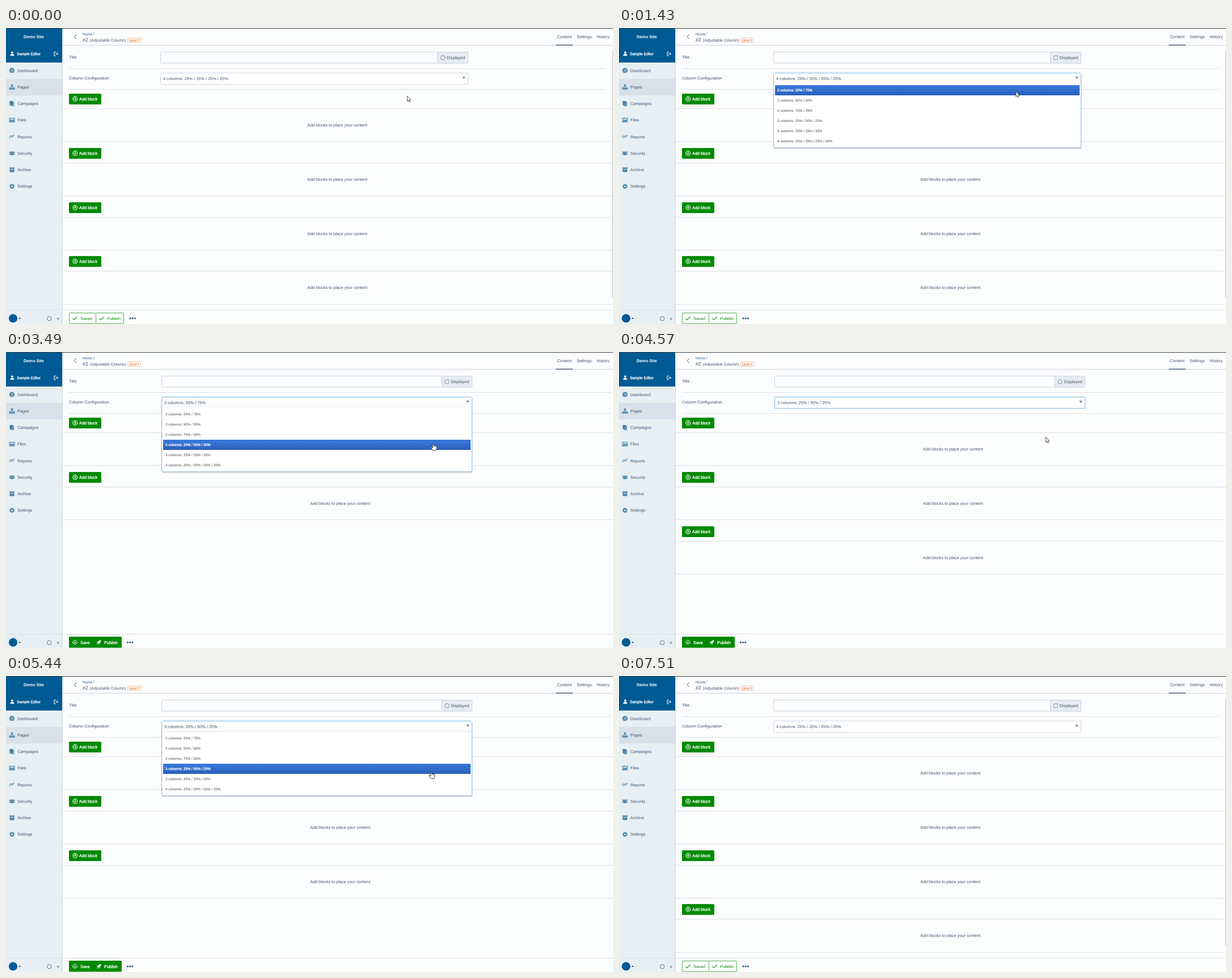
An HTML page for the animation above (7790 ms loop, 1070 by 523 pixels).

```html
<!DOCTYPE html>
<html lang="en">
<head>
<meta charset="utf-8">
<title>Column configuration</title>
<style>
  html, body { margin: 0; width: 100%; height: 100%; overflow: hidden; background: #fcfdfd; }
  svg { display: block; width: 1070px; height: 523px; }
  text { font-family: "Liberation Sans", Arial, sans-serif; text-rendering: geometricPrecision; white-space: pre; }
</style>
</head>
<body>
<svg id="stage" viewBox="0 0 1070 523" xmlns="http://www.w3.org/2000/svg">
  <defs>
    <linearGradient id="hot" x2="0" y2="1">
      <stop offset=".2" stop-color="#3875d7"/><stop offset=".9" stop-color="#2a62bc"/>
    </linearGradient>
    <linearGradient id="fade" x2="0" y2="1">
      <stop offset="0" stop-color="#fff"/><stop offset="1" stop-color="#f8f9f9"/>
    </linearGradient>
  </defs>
  <g id="page"></g>
  <g id="shell"></g>
  <g id="pointer"></g>
</svg>
<script>
const LOOP = 7790;
const INK = '#43536d', BLUE = '#005a93', GREEN = '#008a00', LINE = '#dce2e9', EDGE = '#ced5e1', ICON = '#4480a6';
const OPTIONS = [
  '2 columns: 25% / 75%', '2 columns: 50% / 50%', '2 columns: 75% / 25%',
  '3 columns: 25% / 50% / 25%', '3 columns: 33% / 33% / 33%', '4 columns: 25% / 25% / 25% / 25%'
];

// Each track lists [start time, ...value]; a value holds until the next one.
const CHOICE = [[0, 5], [1550, 0], [3890, 3], [6360, 5]];
const HOT = [[0, -1], [510, 5], [900, 0], [1550, -1], [2610, 0], [3000, 1], [3120, 2], [3490, 3],
  [3890, -1], [4930, 3], [5170, 1], [5290, 3], [5560, 4], [5710, 5], [6360, -1]];
const CURSOR = [
  [0, 707, 120, 'arrow'], [120, 700, 112, 'arrow'], [240, 689, 99, 'hand'], [360, 690, 95, 'hand'],
  [630, 694, 96, 'hand'], [750, 698, 98, 'hand'], [900, 700, 111, 'hand'], [1430, 699.5, 112, 'arrow'],
  [2200, 703, 109, 'arrow'], [2320, 710, 100, 'arrow'], [2470, 713, 92.5, 'hand'],
  [2880, 718, 104, 'hand'], [3000, 733, 127, 'hand'], [3120, 746, 150, 'hand'], [3490, 751.5, 161.5, 'hand'],
  [3610, 752, 166, 'hand'], [3890, 752, 166, 'arrow'], [4570, 752, 150, 'arrow'], [4690, 750, 118, 'arrow'],
  [4810, 748, 96, 'hand'], [4930, 747.5, 92, 'hand'], [5170, 748, 126, 'hand'], [5290, 748, 159, 'hand'],
  [5440, 748, 169, 'hand'], [5560, 748, 189, 'hand'], [5710, 748, 192, 'hand'], [6240, 748, 192, 'arrow'],
  [6730, 758, 199, 'arrow'], [6880, 890, 338, 'arrow'], [7000, 1037, 490, 'arrow'], [7150, 1045, 511, 'arrow'],
  [7270, 0, 0, '']
];
const at = (track, t) => track.filter(k => k[0] <= t).pop().slice(1);

const rect = (x, y, w, h, fill, more = '') => `<rect x="${x}" y="${y}" width="${w}" height="${h}" fill="${fill}" ${more}/>`;
const box = (x, y, w, h, fill, stroke, r = 1) => rect(x + .5, y + .5, w - 1, h - 1, fill, `stroke="${stroke}" rx="${r}"`);
const hline = (x, y, end, color = LINE) => rect(x, y, end - x, 1, color);
const path = (d, color, w = 1, fill = 'none') => `<path d="${d}" stroke="${color}" stroke-width="${w}" fill="${fill}"/>`;
const solid = (d, fill) => `<path d="${d}" fill="${fill}"/>`;
const dot = (x, y, r, fill, more = '') => `<circle cx="${x}" cy="${y}" r="${r}" fill="${fill}" ${more}/>`;
const ring = (x, y, r, color, w = 1) => dot(x, y, r, 'none', `stroke="${color}" stroke-width="${w}"`);
const place = (x, y, inner) => `<g transform="translate(${x} ${y})">${inner}</g>`;
const text = (s, x, y, fill = INK, size = 7.33, more = '') =>
  `<text x="${x}" y="${y}" fill="${fill}" font-size="${size}" ${more}>${s}</text>`;
const medium = (s, x, y, size = 7.33) => text(s, x, y, '#fff', size, 'stroke="#fff" stroke-width=".3"');

// Icons are centred on 0,0.
const ICONS = {
  Dashboard: dot(0, 0, 4.6, ICON) + ring(0, .3, 2.8, '#a9c6d8', .7) + path('M0 1.5L1-2', '#fff', .9),
  Pages: solid('M-1.6-4.5h3.2v3h-3.2zM-5 1.4h3v3h-3zM-1.5 1.4h3v3h-3zM2 1.4h3v3H2z', ICON) +
    path('M0-2V1.5M-3.5 1.5V0H3.5V1.5', ICON, .8),
  Campaigns: solid('M-4-4.5H2V3H-4z', ICON) + path('M3-3V4H-2.5', ICON, 1.1),
  Files: rect(-4.5, -3.5, 9, 7, '#dfe9ee', `stroke="${ICON}"`) + solid('M-3.5 2.5V1L-1.5-1 0 .8 2-1.8 3.5 0V2.5z', ICON) + dot(-2, -1.6, .8, ICON),
  Reports: path('M-4.8 3L-1.5-.5 .8 1.5 4.5-3.5M-4.8 .5L-2-2.3 .6-.6 3-3', ICON, 1),
  Security: dot(-3.1, -1.5, 1.4, ICON) + dot(3.1, -1.5, 1.4, ICON) + dot(0, -1.2, 1.8, ICON) +
    solid('M-5 2.3Q-5 0-2.5 .2H2.5Q5 0 5 2.3zM-2.8 3.2Q-2.8 .6 0 .6T2.8 3.2z', ICON),
  Archive: solid('M-4.6-4H4.6V-1.7H-4.6zM-4-1.1H4V4H-4z', ICON) + rect(-1.4, -.2, 2.8, .9, '#dfe9ee'),
  Settings: ring(0, 0, 2.5, ICON, 1.8) + dot(0, 0, 3.7, 'none', `stroke="${ICON}" stroke-width="1.5" stroke-dasharray="1.45 1.45"`)
};

const POINTERS = {
  arrow: `<path d="M.3 .3V9.4L2.3 7.6 3.8 10.7 5.3 10 3.9 7H6.7z" fill="#fff" stroke="#222" stroke-width=".8"/>`,
  hand: `<path d="M.2 1Q1.2-.2 2 1L2.6 4.3 4 4 5 4.5 6 4.4 6.8 5.1Q8 5 8 6.3L7.5 9.7 6.5 12.3H1.5L-2.6 7.8Q-2.9 6.2-1.4 6.5L.8 7.8z" fill="#fff" stroke="#222" stroke-width=".9" stroke-linejoin="round"/>` +
    path('M3 5V7M5 5V7M6.6 5.5V7', '#777', .5)
};

function shell() {
  const rows = Object.keys(ICONS).map((name, i) => {
    const y = 75 + 29.25 * i;
    return (i === 1 ? rect(0, 90, 99, 29, '#d8e1e9') : '') + place(10.5, y, ICONS[name]) + text(name, 20, y + 2.5);
  }).join('');
  return rect(0, 0, 99, 523, '#e7eff3') + rect(99, 0, 1, 523, EDGE) +
    rect(0, 0, 99, 61, BLUE) + hline(0, 30, 99, '#00507f') +
    text('Demo Site', 31, 17.8, '#fff', 7.33, 'font-weight="bold"') +
    dot(11, 43.6, 2, '#fff') + solid('M7.5 49Q7.5 45.6 11 45.8T14.5 49z', '#fff') + medium('Sample Editor', 19, 48.3, 6.7) +
    path('M88 42.3H85V49H88M87 45.6H91.5M89.5 43.5L91.7 45.6 89.5 47.8', '#fff', 1) + rows +
    hline(0, 498, 1070, LINE) + dot(12.5, 513, 7.6, BLUE) + solid('M22 514L24.2 511.3 26.4 514z', INK) +
    ring(76.3, 513.5, 3.7, INK, .8) + text('«', 89.5, 516, INK, 8.5) +
    path('M124 11.5L120 15.3 124 19.2', INK, .9) + text('Home /', 135, 12.6, '#1c5f94', 6.4) +
    text('#2', 135, 24, INK, 8.6) + text('(Adjustable Column)', 148, 24, INK, 6.98) +
    box(214, 17, 24, 9, '#fffaf6', '#f3c4a4') + text('DRAFT', 216.7, 23.5, '#d2581c', 5.5) +
    text('Content', 971.3, 18) + text('Settings', 1006, 18) + text('History', 1041.3, 18) +
    hline(100, 30, 1070, EDGE) + rect(969, 29.6, 30, 1.4, INK) + rect(0, 0, 1070, 1, '#3a3f45');
}

function block(i, mid, end) {
  const y = 116 + 95.8 * i;
  const top = Math.round(y);
  return rect(111, top, 57, 19, GREEN, 'rx="1.5"') + ring(121.8, top + 9.3, 3.9, '#fff', 1.1) +
    path(`M119.6 ${top + 9.3}h4.4M121.8 ${top + 7.1}v4.4`, '#fff', 1.1) + medium('Add block', 129, top + 11.8) +
    hline(100, Math.round(y + 26), end) + hline(100, Math.round(y + 84.4), end) +
    text('Add blocks to place your content', mid, top + 57.6, INK, 7.33, 'text-anchor="middle"');
}

function actions(saved, settled) {
  const tick = x => path(`M${x} 513.2l2.6 2.6 5.2-5.6`, GREEN, 1.1);
  const dots = x => [0, 4.1, 8.2].map(d => dot(x + d, 513, 1.6, '#22577f')).join('');
  if (saved) {
    return box(111, 503, 48, 20, '#fff', '#4dad4d') + box(158, 503, 50, 20, '#fff', '#4dad4d') +
      tick(117.5) + tick(164.5) + text('Saved', 131, 515.7, GREEN) + text('Publish', 178, 515.7, GREEN) + dots(219);
  }
  return rect(111, 503, 93, 19.5, settled ? GREEN : '#3fa33f', 'rx="1.5"') +
    path('M119.5 515.5Q117 515 117.4 512.7 118 511 119.3 511 120 508.7 122.2 509.2 124.2 509.7 124.2 511.5 126 512.2 125.4 514 125 515.3 123.6 515.5M121.5 517.5V512.5M119.7 514.2L121.5 512.3 123.3 514.2', '#fff', 1) +
    medium('Save', 131, 515.7) +
    solid('M167.5 509Q163.8 509.4 162.4 511.7L160.5 512 160 513.6 162 513.7 163 514.7 163.1 516.7 164.6 516.2 165 514.3Q167.4 512.8 167.5 509zM161.3 514.6L160 517 162.3 515.8z', '#fff') +
    medium('Publish', 173, 515.7) + dots(214.5);
}

function select(t, x, w, choice, hot) {
  const focus = t >= 510 && t < 7510;
  const edge = focus ? '#7db5db' : EDGE;
  const arrow = solid(`M${x + w - 10.5} 86h5l-2.5 4z`, '#6b7687');
  const value = text(OPTIONS[choice], x + 5, 91.6);
  if (hot < 0) return box(x, 79, w, 21, '#fff', edge) + value + arrow;
  const list = OPTIONS.map((s, i) => {
    const y = 101 + 18 * i;
    return (i === hot ? rect(x + 3, y, w - 6, 18, 'url(#hot)') : '') +
      (i === hot ? medium(s, x + 7, y + 11.3, 6.22) : text(s, x + 7, y + 11.3, '#444', 6.22));
  }).join('');
  return rect(x + 1, 211, w - 1, 3, '#000', 'opacity=".12"') + box(x, 79, w, 133, '#fff', edge, 2) +
    rect(x + 1, 80, w - 2, 18, 'url(#fade)') + hline(x + 1, 211, x + w - 1, '#9db4c6') +
    (t >= 5170 ? hline(x + 3, 98, x + w - 3, '#e6eaee') : '') + value + arrow + list;
}

function page(t, choice, hot) {
  const cols = Number(OPTIONS[choice][0]);
  const narrow = cols === 4;
  const x = narrow ? 272 : 274, w = narrow ? 543 : 548, addon = narrow ? 760 : 767.5;
  const end = narrow ? 1057 : 1067;
  const blocks = Array.from({ length: cols }, (_, i) => block(i, narrow ? 584 : 589, narrow ? 1068 : 1070)).join('');
  return rect(0, 0, 1070, 523, '#fcfdfd') + text('Title', 111, 53.8) + text('Column Configuration', 111, 90.8) +
    hline(111, 71, end) + hline(111, 108, end) +
    box(x, 42, w, 20.5, '#fcfdfe', EDGE) + box(addon, 42, x + w - addon, 20.5, '#e8ecf2', EDGE) +
    rect(addon + 6.7, 49.3, 6.4, 6.4, '#fff', 'stroke="#69758a" stroke-width=".9" rx="1"') +
    text('Displayed', addon + 16.8, 54.5) + blocks + select(t, x, w, choice, hot) +
    (narrow ? rect(1069, 40, 1, 436, '#b9bec6') : '');
}

const $ = id => document.getElementById(id);
$('shell').innerHTML = shell() + '<g id="actions"></g>';
let last = '';

function draw(t) {
  const [choice] = at(CHOICE, t), [hot] = at(HOT, t), [cx, cy, kind] = at(CURSOR, t);
  const settled = t >= 1700;
  const key = [choice, hot, cx, cy, kind, settled, t >= 510, t >= 5170, t >= 6480, t >= 7510].join();
  if (key === last) return;
  last = key;
  $('page').innerHTML = page(t, choice, hot);
  $('actions').innerHTML = actions(t < 1550 || t >= 6480, settled);
  $('pointer').innerHTML = kind ? place(cx, cy, POINTERS[kind]) : '';
}

const start = performance.now();
function tick() {
  draw((performance.now() - start) % LOOP);
  requestAnimationFrame(tick);
}
tick();
</script>
</body>
</html>
```
